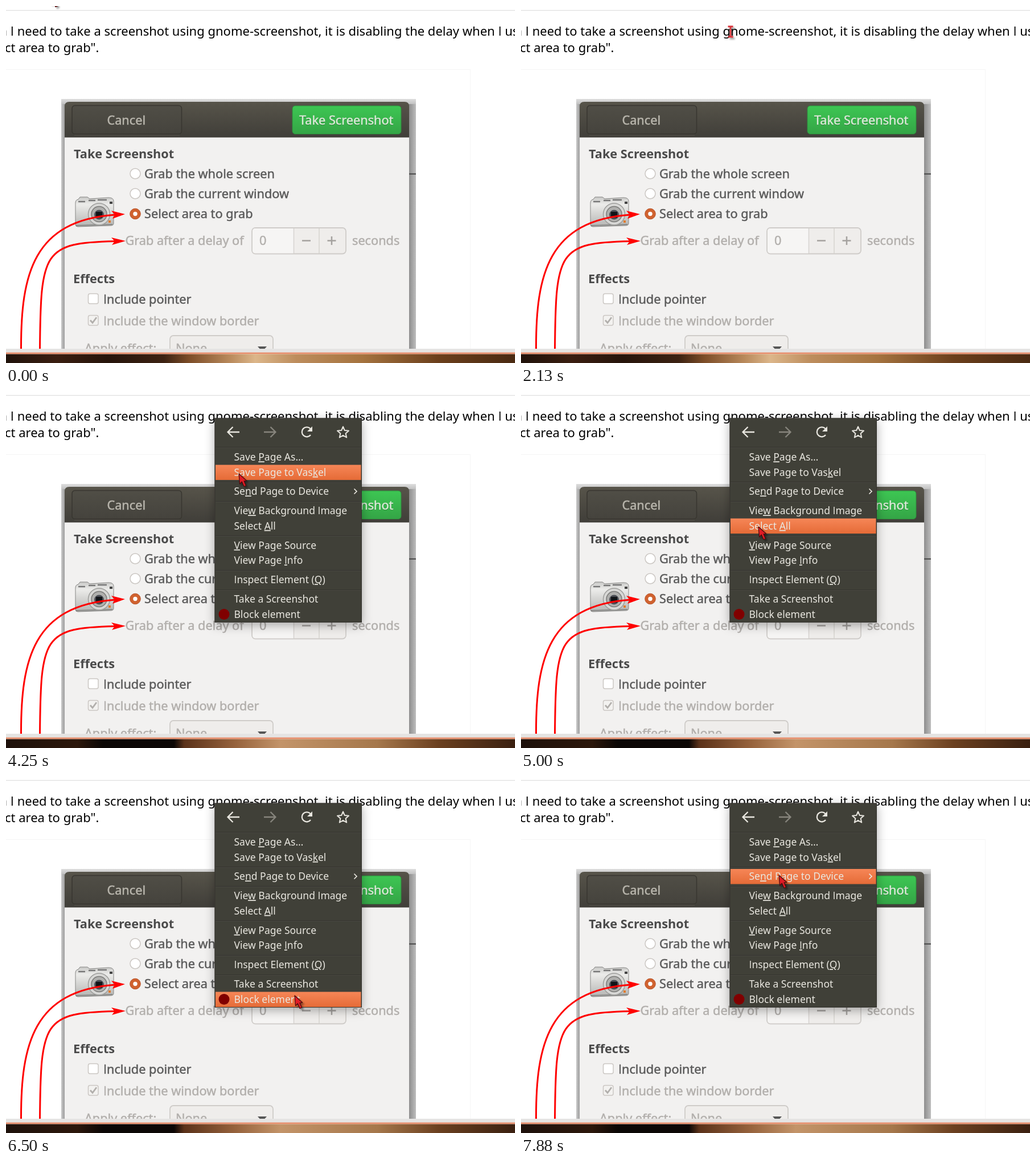
Recreate the animation shown at these times as an HTML page. Size 894 px wide and 626 px high, loop 8 s.

```html
<!DOCTYPE html>
<html lang="en">
<head>
<meta charset="utf-8">
<title>Context menu</title>
<style>
  html, body { margin: 0; width: 100%; height: 100%; overflow: hidden; background: #fff; }
  svg { display: block; width: 894px; height: 626px; }
  text { font-family: "Noto Sans", "Open Sans", sans-serif; white-space: pre; }
  .cap { font-family: "Open Sans", sans-serif; }
  .u { text-decoration: underline; text-decoration-thickness: 1px; }
  .page { font-size: 22px; fill: #000; }
  .dlg { font-size: 21.7px; fill: #5b5b5b; stroke: #5b5b5b; stroke-width: .5px; }
  .head { font-size: 21.7px; font-weight: 700; fill: #4a4a4a; }
  .off { fill: #b2afac; stroke: #b2afac; }
  .item { font-size: 17.5px; fill: #e9e7e0; }
</style>
</head>
<body>
<svg viewBox="0 0 894 626" xmlns="http://www.w3.org/2000/svg">
  <defs>
    <linearGradient id="bar" x2="0" y2="1"><stop stop-color="#57544a"/><stop offset="1" stop-color="#403e39"/></linearGradient>
    <linearGradient id="cancel" x2="0" y2="1"><stop stop-color="#504e46"/><stop offset="1" stop-color="#45433d"/></linearGradient>
    <linearGradient id="green" x2="0" y2="1"><stop stop-color="#3dc653"/><stop offset="1" stop-color="#34a546"/></linearGradient>
    <linearGradient id="orange" x2="0" y2="1"><stop stop-color="#f68657"/><stop offset="1" stop-color="#e56b37"/></linearGradient>
    <linearGradient id="metal" x2="0" y2="1"><stop stop-color="#c9c9c7"/><stop offset=".25" stop-color="#ececea"/><stop offset="1" stop-color="#b4b4b2"/></linearGradient>
    <linearGradient id="top" x2="0" y2="1"><stop stop-color="#dedede"/><stop offset="1" stop-color="#b8b8b8"/></linearGradient>
    <linearGradient id="left"><stop stop-color="#c9c9c9"/><stop offset="1" stop-color="#979797"/></linearGradient>
    <linearGradient id="right"><stop stop-color="#8a8a8a"/><stop offset="1" stop-color="#bdbdbd"/></linearGradient>
    <filter id="soft" x="-5%" y="-5%" width="110%" height="110%"><feGaussianBlur stdDeviation=".65"/></filter>
    <filter id="menuShadow" x="-20%" y="-15%" width="140%" height="130%"><feDropShadow dx="0" dy="5" stdDeviation="9" flood-opacity=".32"/></filter>
    <filter id="tipShadow" x="-50%" y="-50%" width="220%" height="220%"><feDropShadow dx="3" dy="3" stdDeviation="1.4" flood-opacity=".38"/></filter>
    <clipPath id="view"><rect width="894" height="601"/></clipPath>
  </defs>

  <rect width="894" height="626" fill="#fff"/>
  <rect y="7" width="894" height="1.3" fill="#e1e1e1"/>
  <path d="M0 111.5H815.5V601" fill="none" stroke="#f5f5f5"/>
  <g id="page"></g>

  <g clip-path="url(#view)">
    <g filter="url(#soft)">
      <rect x="97" y="163" width="623" height="12" fill="url(#top)"/>
      <rect x="97" y="172" width="7" height="440" fill="url(#left)"/>
      <rect x="707" y="172" width="13" height="440" fill="url(#right)"/>
      <path d="M707 294.5H720" stroke="#444" stroke-width="2"/>
      <rect x="103" y="220" width="605" height="391" fill="#f2f1f0"/>
      <path d="M103 230.5V176Q103 168 111 168H700Q708 168 708 176V230.5Z" fill="url(#bar)"/>
      <rect x="116" y="174.5" width="192.5" height="50" rx="5" fill="url(#cancel)" stroke="#383630" stroke-width="1.5"/>
      <path d="M120 226.5H305" stroke="#55524a"/>
      <rect x="503" y="175" width="191" height="49.5" rx="5" fill="url(#green)" stroke="#2f8a3c"/>

      <g fill="#fff" stroke="#cbc7c3" stroke-width="1.5">
        <circle cx="227" cy="294" r="9"/><circle cx="227" cy="329" r="9"/>
        <rect x="144.5" y="504.5" width="17.5" height="17.5" rx="3"/>
        <rect x="144.5" y="542.5" width="17.5" height="17.5" rx="3" fill="#f3f2f0"/>
      </g>
      <circle cx="227" cy="364.5" r="9.3" fill="#d0622f" stroke="#b9542b"/>
      <circle cx="227" cy="364.5" r="3.7" fill="#fff"/>
      <path d="M148 551L152 555.5L159 546" fill="none" stroke="#b2afac" stroke-width="2.8"/>

      <rect x="432" y="389" width="165" height="45.5" rx="6" fill="#efedeb" stroke="#cfccc9" stroke-width="1.8"/>
      <path d="M505 390H438Q433 390 433 395V428Q433 433.5 438 433.5H505Z" fill="#f6f5f4"/>
      <path d="M505.5 390V434M550 390V434" stroke="#d6d3d0" stroke-width="1.5"/>
      <path d="M520 411.5H535M564.5 411.5H579.5M572 404V419" stroke="#a5a29f" stroke-width="2.5"/>
      <rect x="288" y="578" width="181" height="45" rx="6" fill="#efedeb" stroke="#cfccc9" stroke-width="1.8"/>
      <path d="M442 597H458L450 606Z" fill="#555"/>

      <path d="M122 345Q122 340 127 339L130 335H143L147 338L180 336Q189 336 189 342V381Q189 385 184 385L126 387Q122 387 122 383Z" fill="url(#metal)" stroke="#858583"/>
      <path d="M127 343H139M145 341H157M161 340H177" stroke="#777" stroke-width="2.5"/>
      <path d="M123 385L187 383" stroke="#8b8b89" stroke-width="2"/>
      <circle cx="163.5" cy="365" r="19" fill="#d8d8d6" stroke="#9c9c9a" stroke-width="1.5"/>
      <circle cx="163.5" cy="365" r="13.5" fill="#b0b0ae" stroke="#7a7a78" stroke-width="1.5"/>
      <circle cx="163.5" cy="366" r="8.5" fill="#4b4e55"/>
      <rect x="158" y="361" width="11" height="10" fill="#111418"/>
      <path d="M180 378H184" stroke="#e07b2e" stroke-width="4"/>
      <path d="M182 345H187" stroke="#444" stroke-width="4"/>
      <g id="dialog"></g>
    </g>
    <g fill="none" stroke="#f00" stroke-width="3">
      <path d="M26.5 602C26 470 48 376 192 366"/>
      <path d="M59.5 602C61 430 65 415 192 412.5"/>
    </g>
    <g fill="#f00">
      <path d="M209 365L185 359L191 366L187 373Z"/>
      <path d="M210 412L185 406L191 412.5L186 419Z"/>
    </g>
  </g>

  <rect y="601" width="894" height="7" fill="#e5e4e3"/>
  <rect y="607.5" width="894" height="3" fill="#e88f6d"/>
  <rect id="photo" y="610.5" width="894" height="15.5"/>

  <g id="menu">
    <rect x="366.5" y="47.5" width="258.5" height="358.5" fill="#403f39" filter="url(#menuShadow)"/>
    <rect x="367" y="48" width="257.5" height="357.5" fill="none" stroke="#34332e"/>
    <g fill="none" stroke="#e9e7e0" stroke-width="2.3">
      <path d="M410 72H390M398.5 63L389.5 72L398.5 81"/>
      <path d="M453 72H473M464.5 63L473.5 72L464.5 81" stroke="#87857d"/>
      <path d="M535 77A8.5 8.5 0 1 1 534.5 66"/>
      <path d="M538 62V71H529Z" fill="#e9e7e0" stroke="none"/>
      <path id="star" stroke-width="2" stroke-linejoin="round"/>
    </g>
    <g id="lines"></g>
    <rect id="hover" x="368" width="255.5" height="26.5" fill="url(#orange)"/>
    <g id="items"></g>
    <path d="M611.5 171.5L616 176L611.5 180.5" fill="none" stroke="#e9e7e0" stroke-width="1.7"/>
    <circle cx="383" cy="391.5" r="9.5" fill="#800000"/>
  </g>

  <g id="cursor" filter="url(#tipShadow)">
    <path id="arrow" d="M0 0L1.5 18L5.3 14L9 22.5L12.5 21L9 12.8L13.5 12.3Z" fill="#e01f26" stroke="#4a080b" stroke-width="1.2" stroke-linejoin="round"/>
    <path id="beam" d="M-4.5 -9H4.5M0 -9V9M-4.5 9H4.5" fill="none" stroke="#d5353a" stroke-width="2.8"/>
  </g>
</svg>

<script>
const $ = id => document.getElementById(id);

// An underscore marks the access key of a label.
const rich = s => s
  .replace(/_(.)/g, '<tspan class="u">$1</tspan>')
  .replace(/I/g, '<tspan class="cap">I</tspan>');
const label = (x, y, s, cls, extra = '') =>
  `<text x="${x}" y="${y}" class="${cls}" ${extra}>${rich(s)}</text>`;

$('page').innerHTML =
  label(-11.5, 51.5, 'n I need to take a screenshot using gnome-screenshot, it is disabling the delay when I use', 'page') +
  label(-2, 80.5, 'ct area to grab".', 'page');

$('dialog').innerHTML = [
  [177.5, 208, 'Cancel', 'dlg', 'style="fill:#b9b6ad;stroke:#b9b6ad"'],
  [515, 209, 'Take Screenshot', 'dlg', 'style="fill:#216e2c;stroke:none"'],
  [515, 208, 'Take Screenshot', 'dlg', 'style="fill:#dcebd9;stroke:#dcebd9"'],
  [119, 267, 'Take Screenshot', 'head'],
  [243, 302, 'Grab the whole screen', 'dlg'],
  [243, 337, 'Grab the current window', 'dlg'],
  [243, 372, 'Select area to grab', 'dlg'],
  [209.5, 419, 'Grab after a delay of', 'dlg off'],
  [445, 419, '0', 'dlg off'],
  [608, 419, 'seconds', 'dlg off'],
  [118, 485.5, 'Effects', 'head'],
  [171, 521.5, 'Include pointer', 'dlg'],
  [171, 559.5, 'Include the window border', 'dlg off'],
  [138, 607.5, 'Apply effect:', 'dlg off'],
  [298, 607.5, 'None', 'dlg off']
].map(row => label(...row)).join('');

const ROW = 26.5;
const items = [
  [103, 'Save _Page As…'], [129.5, 'Save Page to Vas_kel'],
  [163, 'Se_nd Page to Device'],
  [197, 'Vie_w Background Image'], [223.5, 'Select _All'],
  [257.5, '_View Page Source'], [284, 'View Page _Info'],
  [318, 'Inspect Element (_Q)'],
  [352, 'Take a Screenshot'], [378.5, 'Block element']
];
$('items').innerHTML = items.map(([y, s]) => label(400.5, y + 19.3, s, 'item')).join('');
$('lines').innerHTML = [98.5, 159.5, 193.5, 253.5, 314.5, 348.5].map(y =>
  `<path d="M368 ${y}H624" stroke="#35342f"/><path d="M368 ${y + 1}H624" stroke="#484741"/>`).join('');

$('star').setAttribute('d', 'M' + Array.from({ length: 10 }, (_, i) => {
  const a = i * Math.PI / 5, r = i % 2 ? 4.8 : 10.5;
  return [592 + r * Math.sin(a), 73 - r * Math.cos(a)].map(v => v.toFixed(1));
}).join('L') + 'Z');

// Photo strip while the menu is closed and while it is open.
const strips = [
  '#20120b 0%, #3a1e10 10%, #26140b 20%, #3c2212 31%, #7d4d28 36%, #b98a5c 44%, #dcb68a 49%, #bd8d5d 57%, #a5733f 70%, #6b3f1c 85%, #4a2a12 100%',
  '#1e110b 0%, #2c170b 14%, #0b0705 19%, #0c0705 33%, #5b321a 35%, #96623c 45%, #c39469 54%, #a5774b 73%, #6b4020 85%, #3a2010 100%'
].map((stops, i) => {
  const body = stops.split(', ').map(s => {
    const [color, at] = s.split(' ');
    return `<stop offset="${at}" stop-color="${color}"/>`;
  }).join('');
  document.querySelector('defs').insertAdjacentHTML('beforeend', `<linearGradient id="strip${i}">${body}</linearGradient>`);
  return `url(#strip${i})`;
});

// Pointer way points: [tick, x, y], eight ticks per second.
const TICK = 125, LOOP = 8000, MENU_TICK = 22;
const way = [
  [0, 78, -21], [3, 78, -21], [10, 348, 55], [11, 348, 55], [13, 382, 45], [14, 382, 45],
  [17, 368, 45], [18, 368, 45], [20, 365, 47], [21, 365, 47], [22, 362, 44], [27, 362, 44],
  [34, 409, 145], [41, 418, 254], [45, 428, 325], [48, 446, 394], [50, 519, 403], [51, 519, 403],
  [57, 446, 294], [58, 450, 262], [63, 453, 174], [64, 453, 174]
];

function pointerAt(tick) {
  const i = way.findIndex(p => p[0] > tick);
  const [t0, x0, y0] = way[i - 1], [t1, x1, y1] = way[i];
  const k = (tick - t0) / (t1 - t0);
  return [x0 + (x1 - x0) * k, y0 + (y1 - y0) * k];
}

const show = (id, on) => $(id).setAttribute('visibility', on ? 'visible' : 'hidden');

function draw(ms) {
  const tick = Math.floor(Math.floor(ms / 10) * 10 / TICK);
  const [x, y] = pointerAt(tick);
  const open = tick >= MENU_TICK;
  const beam = !open && y > 30;
  const row = open && items.find(([top]) => y >= top && y < top + ROW);

  $('menu').style.display = open ? '' : 'none';
  $('photo').setAttribute('fill', strips[+open]);
  show('hover', row);
  if (row) $('hover').setAttribute('y', row[0]);
  $('cursor').setAttribute('transform', `translate(${Math.round(x)} ${Math.round(y)})`);
  show('beam', beam);
  show('arrow', !beam);
}

const start = performance.now();
function frame() {
  draw((performance.now() - start) % LOOP);
  requestAnimationFrame(frame);
}
frame();
</script>
</body>
</html>
```
